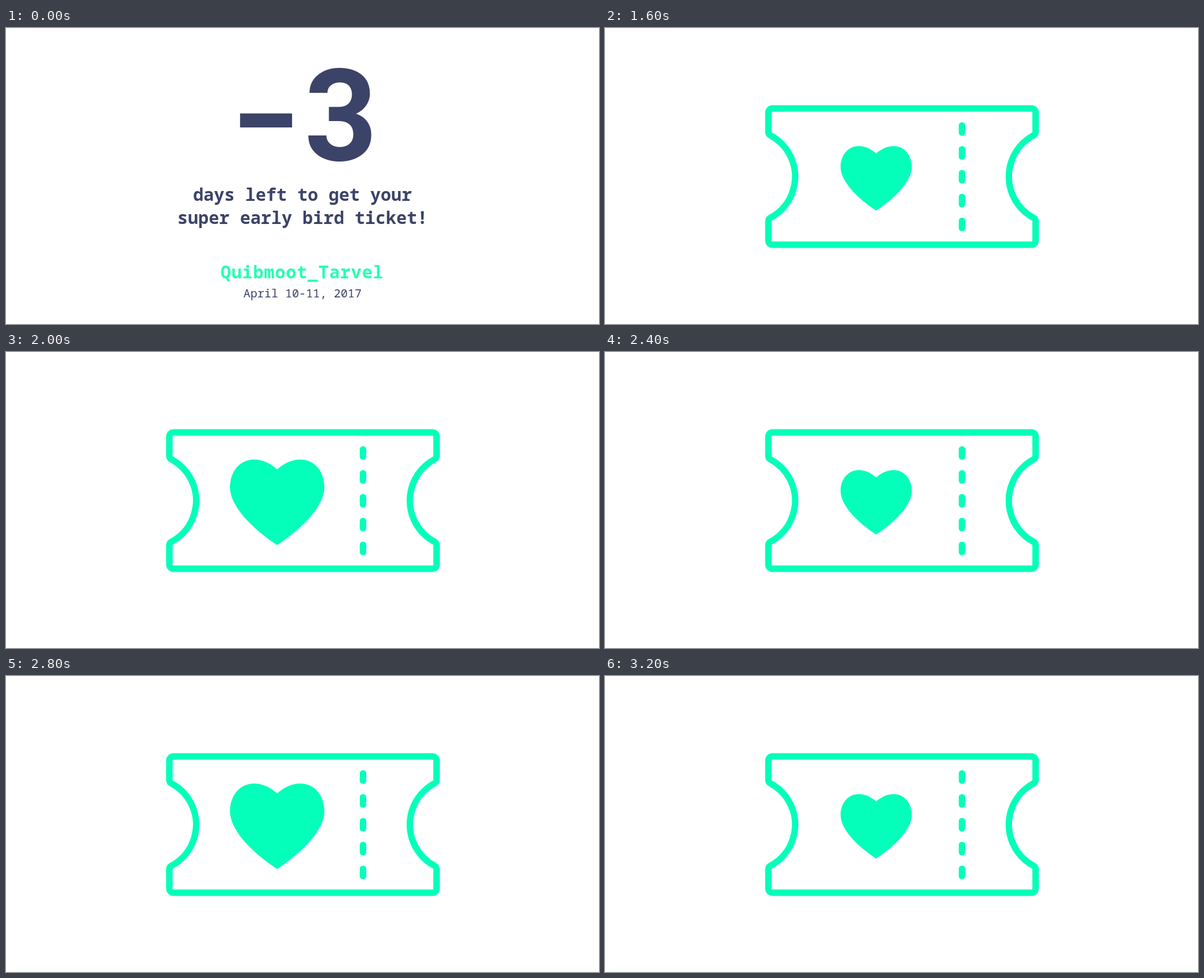
Recreate the animation shown at these times as an HTML page with a canvas. Size 1024 by 512 pixels, loop 3600 ms.

```html
<!DOCTYPE html>
<html lang="en">
<head>
<meta charset="utf-8">
<title>Ticket countdown</title>
<style>
  html, body { margin: 0; width: 100%; height: 100%; overflow: hidden; background: #fff; }
  canvas { display: block; width: 1024px; height: 512px; }
</style>
</head>
<body>
<canvas id="stage" width="1024" height="512"></canvas>
<script>
const ctx = document.getElementById('stage').getContext('2d');
const LOOP = 3600, INTRO = 1600, BEAT = 400;
const NAVY = '#3c4368', MINT = '#03ffb9', TITLE = '#25ffb0';
const MONO = '"Noto Sans Mono", "DejaVu Sans Mono", monospace';

function text(str, x, y, font, color, spacing = 0) {
  ctx.font = font;
  ctx.letterSpacing = spacing + 'px';
  ctx.fillStyle = color;
  ctx.fillText(str, x, y);
}

function drawCountdown() {
  ctx.fillStyle = NAVY;
  ctx.fillRect(404.2, 147.8, 89.8, 24.2);
  ctx.font = 'bold 220px Roboto, sans-serif';
  ctx.letterSpacing = '0px';
  const m = ctx.measureText('3');
  const inkCenter = (m.actualBoundingBoxRight - m.actualBoundingBoxLeft) / 2;
  ctx.fillText('3', 576.2 - inkCenter, 228.7);

  text('days left to get your', 323, 299, `bold 30px ${MONO}`, NAVY);
  text('super early bird ticket!', 296, 339, `bold 30px ${MONO}`, NAVY);
  text('Quibmoot_Tarvel', 370.5, 433, `bold 30px ${MONO}`, TITLE, 0.78);
  text('April 10-11, 2017', 410, 466, `300 20px ${MONO}`, NAVY);
}

// Ticket outline: rounded rectangle with a circular bite on each side
function outline() {
  const p = new Path2D();
  const L = 282.1, R = 743.6, T = 139.2, B = 374.8, mid = 257;
  const r = 7, bite = 80.9, off = 34.7;
  const dx = 38.1, dy = 71.4, a = Math.atan2(dy, dx);
  const corner = 73.3;
  const cl = L - off, cr = R + off;
  p.moveTo(512, T);
  p.arcTo(R, T, R, mid, r);
  p.arcTo(R, mid - corner, cr - dx, mid - dy, r);
  p.arc(cr, mid, bite, Math.PI + a, Math.PI - a, true);
  p.arcTo(R, mid + corner, R, B, r);
  p.arcTo(R, B, 512, B, r);
  p.arcTo(L, B, L, mid, r);
  p.arcTo(L, mid + corner, cl + dx, mid + dy, r);
  p.arc(cl, mid, bite, a, -a, true);
  p.arcTo(L, mid - corner, L, T, r);
  p.arcTo(L, T, 512, T, r);
  p.closePath();
  return p;
}

function heart() {
  const p = new Path2D();
  p.moveTo(0, -57);
  p.bezierCurveTo(-11, -67, -25, -74, -40, -74);
  p.bezierCurveTo(-64, -74, -81.5, -54, -81.5, -26);
  p.bezierCurveTo(-81.5, 6, -45, 44, 0, 74);
  p.bezierCurveTo(45, 44, 81.5, 6, 81.5, -26);
  p.bezierCurveTo(81.5, -54, 64, -74, 40, -74);
  p.bezierCurveTo(25, -74, 11, -67, 0, -57);
  p.closePath();
  return p;
}

const ticketPath = outline(), heartPath = heart();

function drawTicket(heartScale) {
  ctx.strokeStyle = ctx.fillStyle = MINT;
  ctx.lineWidth = 11.2;
  ctx.lineJoin = 'round';
  ctx.stroke(ticketPath);
  for (let i = 0; i < 5; i++) {
    ctx.beginPath();
    ctx.roundRect(610.9, 163 + i * 41.25, 11.2, 23.6, 5.4);
    ctx.fill();
  }
  ctx.save();
  ctx.translate(468.3, 260);
  ctx.scale(heartScale, heartScale);
  ctx.fill(heartPath);
  ctx.restore();
}

function draw(now) {
  const t = now % LOOP;
  ctx.fillStyle = '#fff';
  ctx.fillRect(0, 0, 1024, 512);
  if (t < INTRO) {
    drawCountdown();
  } else {
    const beat = Math.floor((t - INTRO) / BEAT);
    drawTicket(beat % 2 ? 1 : 0.754);
  }
}

const start = performance.now();
function tick() {
  draw(performance.now() - start);
  requestAnimationFrame(tick);
}
tick();
</script>
</body>
</html>
```
